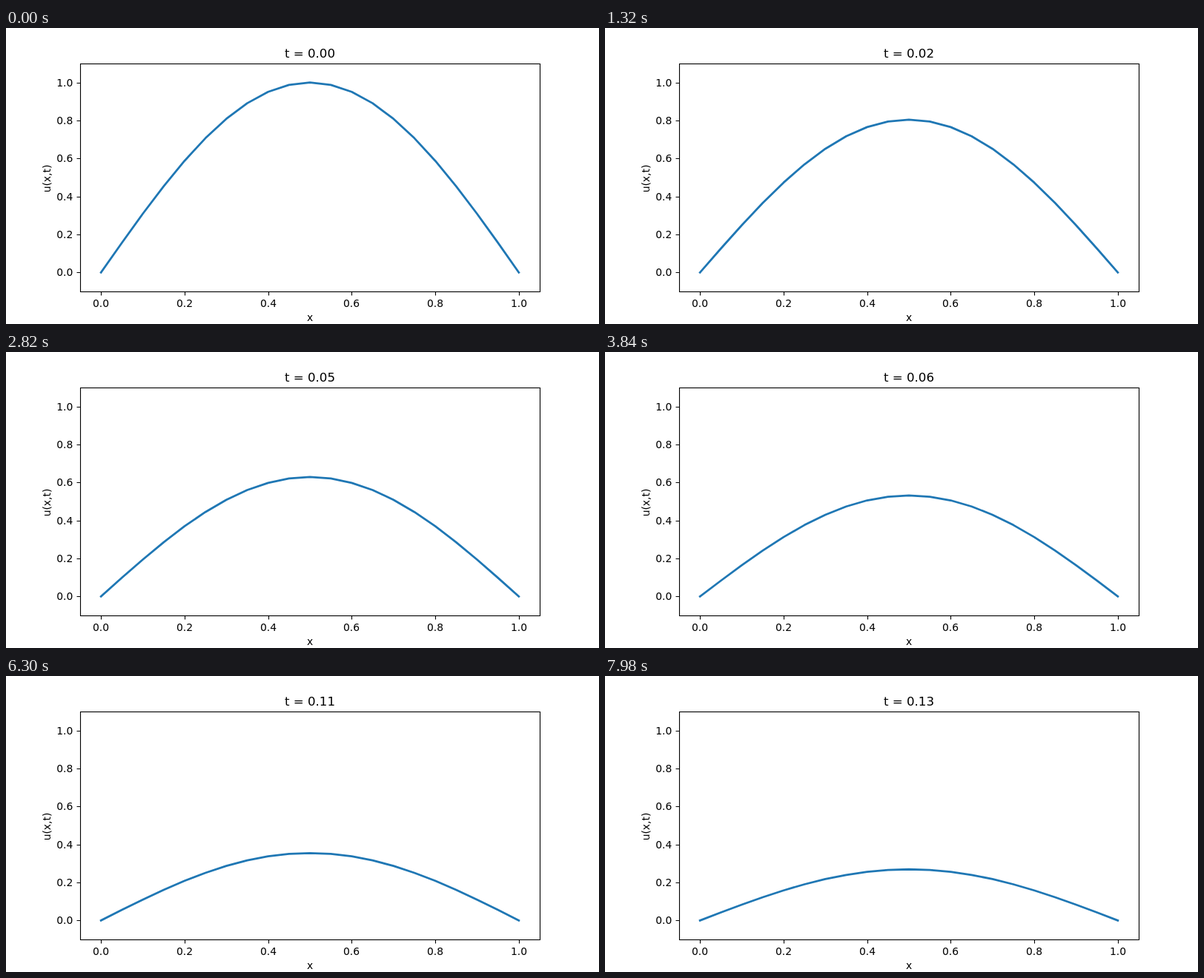
Recreate the animation shown at these times as an HTML page. Size 800 by 400 pixels, loop 8000 ms.

```html
<!DOCTYPE html>
<html lang="en">
<head>
<meta charset="utf-8">
<title>Heat equation</title>
<style>
  html, body { margin: 0; width: 100%; height: 100%; overflow: hidden; background: #fff; }
  svg { display: block; }
  text { font: 13.889px "DejaVu Sans", sans-serif; text-anchor: middle; white-space: pre; }
  #title { font-size: 16.667px; }
  .end { text-anchor: end; }
  .frame { fill: none; stroke: #000; stroke-width: 1.11; }
  #curve { fill: none; stroke: #1f77b4; stroke-width: 2.778; stroke-linejoin: round; stroke-linecap: square; }
</style>
</head>
<body>
<svg width="800" height="400" viewBox="0 0 800 400">
  <g id="ticks"></g>
  <polyline id="curve"/>
  <rect class="frame" x="100.5" y="48.5" width="620" height="308"/>
  <text id="title" x="410" y="40"></text>
  <text x="410" y="396">x</text>
  <text transform="translate(60 203.5) rotate(-90)">u(x,t)</text>
</svg>
<script>
  const LOOP = 8000, STEP = 60, DT = 0.001, CELLS = 20;
  const DECAY = Math.PI * Math.PI * DT;
  const px = x => 100 + 620 * (x + 0.05) / 1.1;
  const py = u => 356 - 308 * (u + 0.1) / 1.2;
  const byId = id => document.getElementById(id);
  const curve = byId('curve'), title = byId('title');

  let ticks = '';
  for (let i = 0; i <= 5; i++) {
    const label = (i / 5).toFixed(1);
    const x = Math.round(px(i / 5)), y = Math.round(py(i / 5));
    ticks += `<path class="frame" d="M${x + 0.5} 356.5v5M100.5 ${y + 0.5}h-5"/>
      <text x="${x}" y="377">${label}</text>
      <text class="end" x="90.3" y="${y + 5}">${label}</text>`;
  }
  byId('ticks').innerHTML = ticks;

  // The first sine mode decays exponentially under diffusion.
  function draw(n) {
    const amplitude = Math.exp(-DECAY * n);
    const points = [];
    for (let i = 0; i <= CELLS; i++) {
      const x = i / CELLS;
      points.push(px(x).toFixed(3) + ',' + py(amplitude * Math.sin(Math.PI * x)).toFixed(3));
    }
    curve.setAttribute('points', points.join(' '));
    title.textContent = 't = ' + (Math.floor((n + 5) / 10) / 100).toFixed(2);
  }

  let start, shown = 0;
  function tick(now) {
    start ??= now;
    const n = Math.floor((now - start) % LOOP / STEP);
    if (n !== shown) draw(shown = n);
    requestAnimationFrame(tick);
  }
  draw(0);
  requestAnimationFrame(tick);
</script>
</body>
</html>
```
